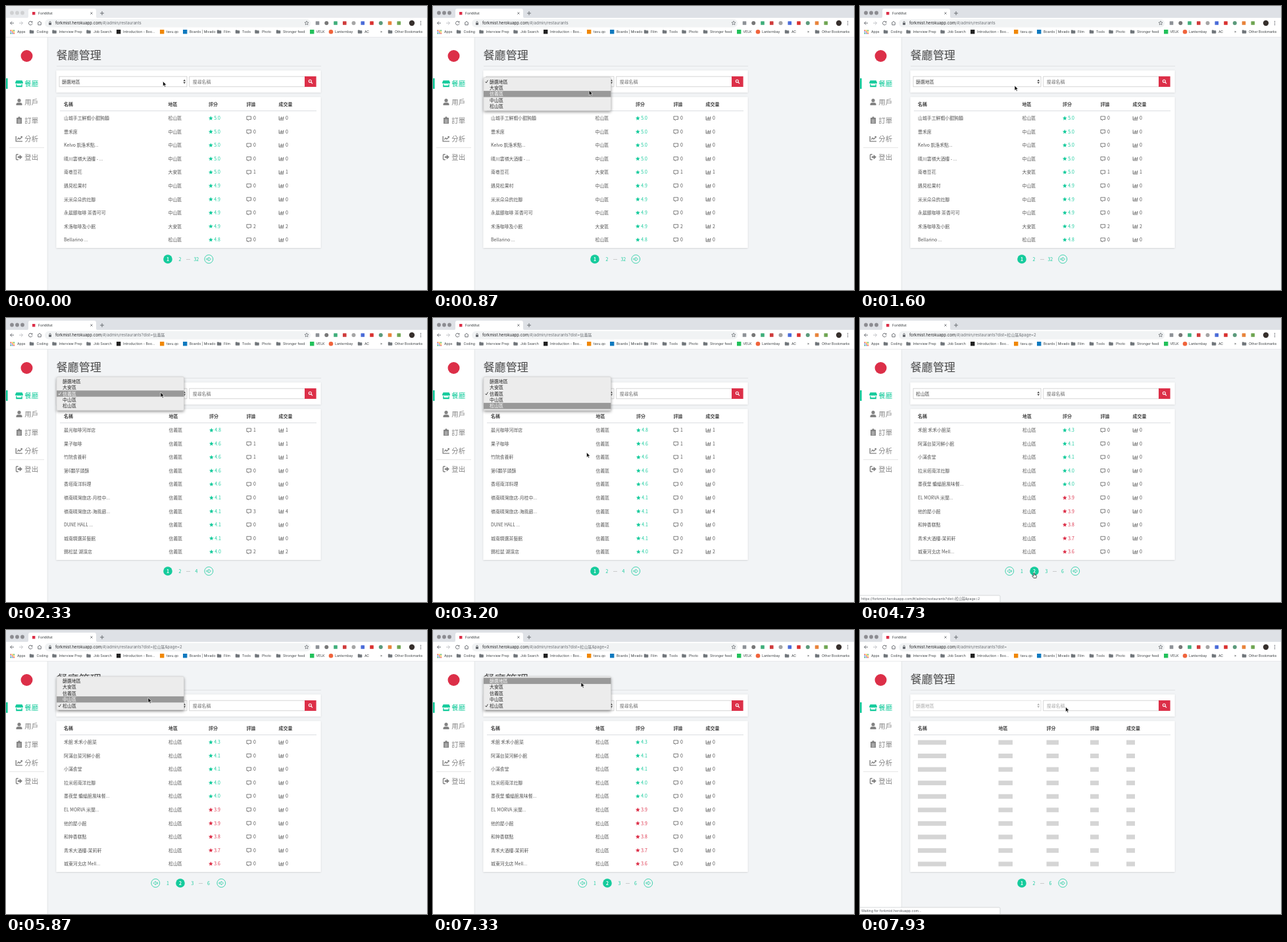
An HTML page that plays this animation: 640 by 432 pixels, repeating every 8 s.

```html
<!DOCTYPE html>
<html lang="zh-Hant">
<head>
<meta charset="utf-8">
<title>ForkMist</title>
<style>
  html, body { margin: 0; width: 100%; height: 100%; overflow: hidden; background: #f2f4f6; }
  svg { display: block; width: 640px; height: 432px; }
  text { font-family: 'Noto Sans CJK TC', 'Noto Sans CJK SC', 'Noto Sans CJK JP', sans-serif; white-space: pre; }
  .ui { font-family: Inter, 'Noto Sans CJK TC', sans-serif; }
</style>
</head>
<body>
<svg id="stage" viewBox="0 0 640 432" xmlns="http://www.w3.org/2000/svg">
  <defs>
    <filter id="soft" x="-10%" y="-20%" width="120%" height="150%">
      <feDropShadow dx="0" dy="0.6" stdDeviation="1" flood-opacity="0.16"/>
    </filter>
    <filter id="deep" x="-10%" y="-20%" width="120%" height="160%">
      <feDropShadow dx="0" dy="2" stdDeviation="2.2" flood-opacity="0.4"/>
    </filter>
  </defs>
  <g id="page"></g>
  <g id="chrome"></g>
  <g id="status"></g>
  <g id="menu"></g>
  <g id="cursor"></g>
</svg>
<script>
const LOOP = 8000;
const GREEN = '#15cb9c', RED = '#dc2f48', GREY = '#838383', INK = '#555';
const $ = id => document.getElementById(id);

// ---------- drawing helpers ----------
const rect = (x, y, w, h, fill, more = '') =>
  `<rect x="${x}" y="${y}" width="${w}" height="${h}" fill="${fill}" ${more}/>`;
const circle = (x, y, r, fill, more = '') =>
  `<circle cx="${x}" cy="${y}" r="${r}" fill="${fill}" ${more}/>`;
const shape = (d, fill, more = '') => `<path d="${d}" fill="${fill}" ${more}/>`;
const pen = (d, color, w = 1) =>
  `<path d="${d}" fill="none" stroke="${color}" stroke-width="${w}"/>`;
const at = (x, y, body) => `<g transform="translate(${x} ${y})">${body}</g>`;
const safe = s => String(s).replace(/&/g, '&amp;');
const text = (x, cy, size, s, fill, more = '') =>
  `<text x="${x}" y="${(cy + size * 0.37).toFixed(2)}" font-size="${size}" fill="${fill}" ${more}>${safe(s)}</text>`;
const ui = (x, cy, size, s, fill) => text(x, cy, size, s, fill, 'class="ui"');

// ---------- content ----------
const DISTRICTS = ['篩選地區', '大安區', '信義區', '中山區', '松山區'];
const HOST = 'forkmist.herokuapp.com', ROUTE = '/#/admin/restaurants';

// one digit per row picks the district, the comments and the orders
const parse = (names, dists, rates, notes = '', orders = notes) =>
  names.split('|').map((name, i) => ({
    name, dist: DISTRICTS[+(dists[i] || dists[0])], rate: (rates[i] / 10).toFixed(1),
    notes: notes[i] || 0, orders: orders[i] || 0
  }));

const LISTS = {
  all: {
    cols: [88, 246.5, 308, 365.5, 414.5],
    rows: parse('山城手工鮮蝦小餛飩麵|豐禾席|Kelvo 凱洛禾點...|晴川雲嶺大酒樓 - ...|南巷豆花|遇見松果村|米米朵朵的灶腳|永晨銀咖啡 茶香可可|禾洛咖啡及小館|Bellarino ...',
      '4333133314', [50, 50, 50, 50, 50, 49, 49, 49, 49, 48], '0000100020')
  },
  xinyi: {
    cols: [88, 247.5, 309, 365.5, 414.5],
    rows: parse('晨光咖啡河岸店|果子咖啡|竹院食養軒|第6顆芋頭酥|香塔南洋料理|嶺南晴灣旅店-月桂中...|嶺南晴灣旅店-海風廊...|DUNE HALL ...|城南精選茶藝館|錫松鼠 湖濱店',
      '2', [48, 46, 46, 46, 46, 41, 41, 41, 41, 40], '1110003002', '1110004002')
  },
  song1: {
    cols: [88, 247, 308, 365.5, 414.5],
    rows: parse('山城手工鮮蝦小餛飩麵|Bellarino ...|青田小麵館|木木早午餐|海味鮮鍋物|雲朵手作甜點|巷口炭火燒肉|日安咖啡|稻香素食小館|河畔義式灶腳',
      '4', [50, 48, 47, 46, 46, 45, 45, 44, 44, 43])
  },
  song2: {
    cols: [88, 247, 308, 365.5, 414.5],
    rows: parse('禾館 禾禾小館菜|阿滿台菜河鮮小館|小滿食堂|拉米塔南洋灶腳|墨夜堡 蝙蝠館風味餐...|EL MORVA 米蘭...|他的屋小館|和粹香糕點|青禾大酒樓-茉莉軒|城東河北店 Mell...',
      '4', [43, 41, 41, 40, 40, 39, 39, 38, 37, 36])
  }
};

// ---------- schedule: each entry changes part of the state ----------
const WAIT = `Waiting for ${HOST}...`;
const LINK = `https://${HOST}${ROUTE}?dist=松山區&page=2`;
const STEPS = [
  [0, { active: 0, query: '', sel: 0, list: 'all', last: 32, page: 1, load: 0, menu: 0, hl: 0, status: '' }],
  [70, { active: 1 }],
  [330, { menu: 1, hl: 0 }], [730, { hl: 1 }], [870, { hl: 2 }],
  [1530, { menu: 0 }],
  [1670, { query: '?dist=信義區', sel: 2, load: 1, status: WAIT }],
  [1930, { load: 0, list: 'xinyi', last: 4 }],
  [2070, { status: '' }],
  [2330, { menu: 1, hl: 2 }], [2470, { hl: 3 }], [2600, { hl: 4 }],
  [3270, { menu: 0 }],
  [3330, { query: '?dist=松山區', sel: 4, load: 1, status: WAIT }],
  [3670, { load: 0, list: 'song1', last: 6, status: '' }],
  [3800, { status: LINK }],
  [4400, { query: '?dist=松山區&page=2', page: 2, load: 1 }],
  [4730, { load: 0, list: 'song2' }],
  [4930, { status: '' }],
  [5600, { menu: 1, hl: 4 }], [5800, { hl: 3 }], [6070, { hl: 2 }], [6200, { hl: 1 }], [6470, { hl: 0 }],
  [7400, { menu: 0 }],
  [7530, { query: '?dist=', sel: 0, page: 1, load: 1, status: WAIT }]
];

// pointer tip: time, x, y
const PATH = [
  [0, 238.5, 114.5], [650, 238.5, 115], [950, 237, 131], [1250, 237, 131], [1600, 235, 121],
  [2000, 235, 113], [2350, 235, 113], [2600, 234, 130], [3000, 234, 131], [3200, 233.5, 204],
  [3530, 255, 340], [3770, 264, 387], [4070, 264.5, 388], [4730, 264.5, 388], [4870, 263, 380],
  [5150, 235, 230], [5470, 215, 113], [5700, 215, 112], [5870, 216, 103], [6130, 222, 94],
  [6270, 224, 86], [6470, 225, 79], [7330, 225, 79.5], [7530, 248, 92], [7930, 312.5, 117], [8000, 314, 117.5]
];

// smooth curve through the points without overshoot
function pointer(t) {
  let i = 0;
  while (i < PATH.length - 2 && PATH[i + 1][0] <= t) i++;
  const slope = (k, c) => k < 0 || k > PATH.length - 2 ? 0 :
    (PATH[k + 1][c] - PATH[k][c]) / (PATH[k + 1][0] - PATH[k][0]);
  const tangent = (k, c) => {
    const a = slope(k - 1, c), b = slope(k, c);
    return a * b > 0 ? 2 * a * b / (a + b) : 0;
  };
  const span = PATH[i + 1][0] - PATH[i][0], u = (t - PATH[i][0]) / span, v = 1 - u;
  return [1, 2].map(c =>
    v * v * (1 + 2 * u) * PATH[i][c] + u * u * (3 - 2 * u) * PATH[i + 1][c] +
    span * (u * v * v * tangent(i, c) - u * u * v * tangent(i + 1, c)));
}

// ---------- browser frame ----------
const folder = x => shape(`M${x - 3.2} 37.2q0-.8.8-.8h1.6l.9.9h2.5q.7 0 .7.7v3q0 .8-.8.8h-4.9q-.8 0-.8-.8z`, '#70757a');

function drawChrome(s) {
  const bar = s.active ? '#dee1e6' : '#e9ebee', light = s.active ? '#8c8c91' : '#cfd0d2';
  const ink = '#3c4043', glyph = '#5f6368';
  let o = rect(0, 0, 640, 19, bar) + rect(0, 18, 640, 29.5, '#fff') + rect(0, 47, 640, 0.6, '#dcdee1');
  o += [9, 17, 25].map(x => circle(x, 10.5, 2.9, light)).join('');
  o += shape('M31 18.5q3 0 3-3V7q0-3 3-3h97q3 0 3 3v8.5q0 3 3 3z', '#fff');
  o += rect(40, 9, 4.4, 4.4, RED) + ui(49, 11.2, 5.3, 'ForkMist', ink);
  o += pen('M128.3 9.5l3.2 3.2m0-3.2l-3.2 3.2', glyph, 0.8) + pen('M143 11h6m-3-3v6', glyph, 0.9);
  // navigation
  o += pen('M12 26H6.5m2.6-2.6L6.5 26l2.6 2.6', glyph, 0.9);
  o += pen('M20 26h5.5m-2.6-2.6l2.6 2.6-2.6 2.6', '#b9bcc0', 0.9);
  o += pen('M39.4 24.3A2.8 2.8 0 1 0 40 26.6', glyph, 0.9) + shape('M40.3 22.8v2.5h-2.5z', glyph);
  o += pen('M48 26l3-2.8 3 2.8m-5.2-.4v3.2h4.4v-3.2', glyph, 0.9);
  o += rect(59, 20, 404, 12.5, '#f1f3f4', 'rx="6.2"');
  o += rect(65, 25.5, 4, 3.2, glyph, 'rx=".4"') + pen('M65.8 25.6v-1a1.2 1.2 0 0 1 2.4 0v1', glyph, 0.7);
  o += `<text class="ui" x="75" y="28.3" font-size="6.1" fill="#202124">${HOST}<tspan fill="#6b6f74">${safe(ROUTE + s.query)}</tspan></text>`;
  o += pen(star(457, 26, 3.2), glyph, 0.7);
  // extensions
  const ext = ['#8d9196', '#777', '#3fae7a', '#cf3a3a', '#a5a5a5', '#4a6bd8', '#d9302f', '#5b9a7b', '#e8833a', '#6fa552'];
  ext.forEach((c, i) => {
    const x = 473.5 + i * 13.75;
    o += i % 3 === 1 ? circle(x, 26, 3, c) : rect(x - 2.8, 23.2, 5.6, 5.6, c, 'rx=".6"');
  });
  o += circle(617, 26, 4.2, '#37302d') + [23.5, 26, 28.5].map(y => circle(630.5, y, 0.75, glyph)).join('');
  // bookmarks
  const dots = ['#ea4335', '#fbbc04', '#34a853', '#4285f4'];
  for (let i = 0; i < 9; i++) o += rect(6.5 + i % 3 * 2.4, 36.5 + Math.floor(i / 3) * 2.2, 1.6, 1.6, dots[i % 4]);
  [39, 73.5, 125.5, 324, 352, 381.5, 414, 538, 584].forEach(x => o += folder(x));
  o += rect(168, 36, 6.4, 6.4, '#222') + rect(234, 36, 6.4, 6.4, '#f08705') + rect(269, 36, 6.4, 6.4, '#0f79bf');
  o += rect(462, 36, 6.4, 6.4, '#22c15a') + circle(494, 39.2, 3.3, '#f0643c');
  const marks = { Apps: 17, Coding: 46.5, 'Interview Prep': 80.5, 'Job Search': 133, 'Introduction - Boo...': 178,
    'tavu.qo': 244, 'Boards | Mivado': 279, Film: 331, Tools: 359, Photo: 389, 'Stronger feed': 421,
    VELK: 471.5, Lanternbay: 500, AC: 545, '»': 569, 'Other Bookmarks': 591 };
  for (const k in marks) o += ui(marks[k], 39.4, 5.15, k, ink);
  return o;
}

// ---------- page parts ----------
function star(x, y, r) {
  let d = '';
  for (let i = 0; i < 10; i++) {
    const a = Math.PI * (i / 5 - 0.5), q = i % 2 ? r * 0.46 : r;
    d += (i ? 'L' : 'M') + (x + q * Math.cos(a)).toFixed(2) + ' ' + (y + q * Math.sin(a)).toFixed(2);
  }
  return d + 'z';
}

const ICONS = [
  c => shape('M-4.5-5h9l1.5 3.3q0 1.7-1.5 1.7t-1.5-1.2q0 1.2-1.5 1.2T0-1.2Q0 0-1.5 0T-3-1.2Q-3 0-4.5 0T-6-1.7z', c) +
    shape('M-4.8.8h1.4v2h6.8v-2h1.4V5h-9.6z', c),
  c => circle(0, -2.4, 2.6, c) + shape('M-4.5 5V3.5Q-4.5.8-1.8.8h3.6q2.7 0 2.7 2.7V5z', c),
  c => shape('M-4-4h2.2a1.8 1.8 0 0 1 3.6 0H4v9h-8z', c) + pen('M-2.3-.8h4.6m-4.6 2h4.6m-4.6 2h4.6', '#fff', 0.6),
  c => pen('M-4.8-4v8H5', c, 1.4) + pen('M-2.8 1.2l2-2.3 1.7 1.7L4-2.6', c, 1.4) + shape('M1.8-3.8h3v3z', c),
  c => pen('M-1.3-4h-2.2q-1 0-1 1v6q0 1 1 1h2.2', c, 1.4) + shape('M-2.2-1.2h2.9v-2.5L4.9 0 .7 3.7V1.2h-2.9z', c)
];

function sidebar() {
  let o = rect(0, 40, 62.5, 400, '#fff', 'filter="url(#soft)"') + circle(31.5, 76, 9, RED);
  o += rect(0, 110, 2.6, 16, GREEN) + rect(5, 215, 53, 0.7, '#ddd');
  ['餐廳', '用戶', '訂單', '分析', '登出'].forEach((s, i) => {
    const y = 118.5 + 27.9 * i, c = i ? GREY : GREEN;
    o += at(20, y - 0.3, ICONS[i](c)) + text(28.3, y, 10.4, s, c, 'font-weight="500"');
  });
  return o;
}

function filters(s) {
  const c = s.load ? '#aaa' : '#3f3f3f';
  let o = rect(76.5, 98, 402, 33.5, '#fff', 'filter="url(#soft)"');
  o += rect(81, 107.2, 194, 15.6, '#fff', `stroke="${s.load ? '#ddd' : '#cbcbcb'}" stroke-width=".8"`);
  o += text(85, 115, 6.9, DISTRICTS[s.sel], c);
  o += shape('M269.4 114.2h3.6l-1.8-2.5zM269.4 115.8h3.6l-1.8 2.5z', c);
  o += rect(278.8, 107.2, 176, 15.6, '#fff', 'stroke="#cbcbcb" stroke-width=".8"');
  o += text(283.8, 115, 6.9, '搜尋名稱', s.load ? '#aaa' : '#707070');
  o += rect(454, 107, 17.6, 16, RED) + circle(462.3, 114.3, 2, 'none', 'stroke="#fff" stroke-width="1.1"');
  return o + pen('M463.8 115.9l2.2 2.2', '#fff', 1.3);
}

const bubble = (x, y) => pen(`M${x} ${y - 2.8}h6.6v4.7h-2.8l-1.7 1.4v-1.4h-2.1z`, INK, 0.75);
const bars = (x, y) => pen(`M${x} ${y - 3}v5.6h7`, INK, 0.8) +
  pen(`M${x + 1.9} ${y + 1.5}v-2m1.5 2v-3.8m1.5 3.8v-2.5m1.5 2.5v-4`, INK, 0.8);

function table(s) {
  const list = LISTS[s.list], cols = s.load ? [88, 210.5, 283.5, 350, 405] : list.cols;
  let o = rect(76.5, 138.5, 402, 229.5, '#fff', 'filter="url(#soft)"') + rect(82, 159, 390, 0.9, '#d9dcdf');
  ['名稱', '地區', '評分', '評論', '成交量'].forEach((h, i) =>
    o += text(cols[i], 149.2, 6.95, h, '#444', 'font-weight="700"'));
  list.rows.forEach((r, i) => {
    const y = 170.7 + 20.55 * i;
    if (s.load) {
      [43, 21.5, 18.5, 13, 13].forEach((w, k) => o += rect(cols[k], y - 3.2, w, 7, '#d5d5d5'));
      return;
    }
    const c = r.rate < 4 ? RED : GREEN;
    o += text(cols[0], y, 6.9, r.name, INK) + text(cols[1], y, 6.9, r.dist, INK);
    o += shape(star(cols[2] + 3.3, y + 0.1, 3.5), c) + text(cols[2] + 8.3, y, 6.9, r.rate, c, 'font-weight="500"');
    o += bubble(cols[3] + 0.4, y) + text(cols[3] + 10.5, y, 6.9, r.notes, INK);
    o += bars(cols[4] + 0.6, y) + text(cols[4] + 10.5, y, 6.9, r.orders, INK);
  });
  return o;
}

const arrow = (x, dir) => circle(x, 385, 6.4, 'none', `stroke="${GREEN}" stroke-width=".8"`) +
  `<g transform="translate(${x} 385) scale(${dir} 1)">` +
  pen('M-3.3-1h3.2v-1.7L3.3 0-.1 2.7V1h-3.2z', GREEN, 0.7) + '</g>';

function pager(s) {
  const num = (x, n) => {
    const on = n === s.page;
    return (on ? circle(x, 385, 6.8, GREEN) : '') +
      text(x, 385, 6.9, n, on ? '#fff' : GREEN, `text-anchor="middle" font-weight="${on ? 700 : 400}"`);
  };
  const dots = x => [-2, 0, 2].map(d => circle(x + d, 385.5, 0.5, '#888')).join('');
  return s.page === 1
    ? num(246, 1) + num(264.5, 2) + dots(277) + num(289.3, s.last) + arrow(308.3, 1)
    : arrow(227.3, -1) + num(246, 1) + num(265, 2) + num(283.5, 3) + dots(296) + num(308, s.last) + arrow(327.3, 1);
}

const drawPage = s => rect(0, 40, 640, 392, '#f2f4f6') + sidebar() +
  text(76.5, 74.3, 17.1, '餐廳管理', '#4a4a4a') + rect(77, 91, 402, 0.7, '#d9dbdd') +
  filters(s) + table(s) + pager(s);

function drawMenu(s) {
  if (!s.menu) return '';
  const pitch = 9.4, top = 115 - s.sel * pitch;
  let o = rect(77, top - 6.6, 193.5, pitch * 5 + 3.8, '#ececec', 'rx="1.6" filter="url(#deep)" stroke="#bbb" stroke-width=".4"');
  DISTRICTS.forEach((d, i) => {
    const y = top + i * pitch, c = i === s.hl ? '#fff' : '#222';
    if (i === s.hl) o += rect(77, y - pitch / 2, 193.5, pitch, '#999');
    if (i === s.sel) o += pen(`M79.6 ${y + 0.2}l1.4 1.8 2.4-4.2`, c, 0.8);
    o += text(86, y, 6.95, d, c);
  });
  return o;
}

const drawStatus = s => s.status
  ? rect(-2, 422, 215, 12, '#fff', 'rx="1.5" stroke="#c6c9cc" stroke-width=".7"') + ui(2, 427.2, 5.15, s.status, '#55595e')
  : '';

const ARROW = shape('M0 0V7.6L1.8 6 3 8.7 4.3 8.1 3.1 5.5H5.5z', '#111', 'stroke="#fff" stroke-width=".6"');
const HAND = shape('M-.7 0q.8-.7 1.5 0v2.8l2.4.5q1 .3.8 1.3L3.4 7.5H-.6L-2.9 4.3q.5-1 1.4-.3l.8.7z',
  '#fff', 'stroke="#111" stroke-width=".7"');

// ---------- playback ----------
const shown = {};
function put(id, html) {
  if (shown[id] !== html) $(id).innerHTML = shown[id] = html;
}

let lastStep = -1;
function render(t) {
  let n = 0;
  while (n < STEPS.length - 1 && STEPS[n + 1][0] <= t) n++;
  if (n !== lastStep) {
    const s = Object.assign({}, ...STEPS.slice(0, n + 1).map(e => e[1]));
    put('page', drawPage(s));
    put('chrome', drawChrome(s));
    put('status', drawStatus(s));
    put('menu', drawMenu(s));
    lastStep = n;
  }
  const [x, y] = pointer(t);
  put('cursor', Math.hypot(x - 265, y - 385) < 7 ? HAND : ARROW);
  $('cursor').setAttribute('transform', `translate(${x.toFixed(2)} ${y.toFixed(2)})`);
}

const start = performance.now();
function tick() {
  render((performance.now() - start) % LOOP);
  requestAnimationFrame(tick);
}
tick();
</script>
</body>
</html>
```
